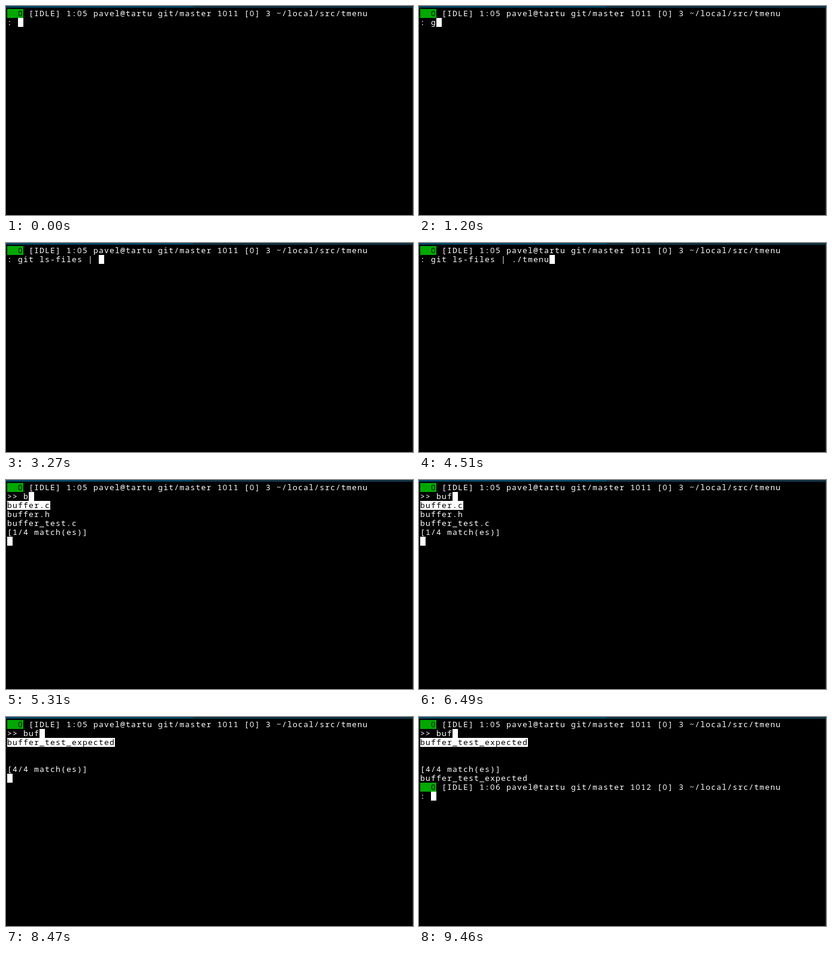
Animation of 680x350 px, one loop 9.82 s. Source, as an HTML page:

```html
<!DOCTYPE html>
<html lang="en">
<head>
<meta charset="utf-8">
<title>Terminal menu</title>
<style>
  html, body { margin: 0; width: 100%; height: 100%; overflow: hidden; background: #000; }
  svg { display: block; width: 680px; height: 350px; }
  text { font: 13px "Noto Sans Mono", "DejaVu Sans Mono", monospace; white-space: pre; }
  .zero { font-family: "Open Sans", "Noto Sans", sans-serif; }
</style>
</head>
<body>
<svg viewBox="0 0 680 350">
  <rect width="680" height="350"/>
  <g shape-rendering="crispEdges">
    <rect width="680" height="3" fill="#004a69"/>
    <rect x="313" width="367" height="2" fill="#14303c"/>
    <rect y="2" width="680" height="1" fill="#0b3a50"/>
    <rect x="679" y="3" width="1" height="347" fill="#26343a"/>
  </g>
  <g id="screen"></g>
</svg>
<script>
const LOOP = 9820, CELL = 9, ROW = 15, LEFT = 2, TOP = 5;
const WHITE = "#fff", BLACK = "#000", GREEN = "#00a800";
const screen = document.getElementById("screen");

const COMMAND = "git ls-files | ./tmenu";
const KEY_TIMES = [
  1120, 1210, 1290, 1380, 1540, 1610, 1820,
  1970, 2050, 2130, 2220, 2400, 2560, 2810, 3270,
  3520, 3630, 3890, 4000, 4110, 4230, 4340
];
const QUERY = "buf", QUERY_TIMES = [5310, 5390, 5540];
const MENU = 4810, STEP_TIMES = [6820, 7040, 7300], ACCEPT = 9330, PROMPT = 9460;

const ALL_FILES = [".gitignore", "Makefile", "README.md"];
const MATCHES = ["buffer.c", "buffer.h", "buffer_test.c", "buffer_test_expected"];
const PAGE = 3;

const passed = (times, t) => times.filter(time => time <= t).length;

function block(col, row, cells, fill) {
  return `<rect x="${LEFT + col * CELL}" y="${TOP + row * ROW}" width="${cells * CELL}" height="${ROW}" fill="${fill}"/>`;
}

function write(col, row, string, fill = WHITE) {
  const xs = [...string].map((_, i) => LEFT + (col + i) * CELL).join(" ");
  const body = string.replace(/>/g, "&gt;").replace(/0/g, '<tspan class="zero">0</tspan>');
  return `<text x="${xs}" y="${TOP + 12 + row * ROW}" fill="${fill}">${body}</text>`;
}

const cursor = (col, row) => block(col, row, 1, WHITE);

function status(row, clock, history) {
  return block(0, row, 3, GREEN) + write(2, row, "0", BLACK) +
    write(4, row, `[IDLE] ${clock} pavel@tartu git/master ${history} [0] 3 ~/local/src/tmenu`);
}

function shell(row, typed) {
  return write(0, row, ": " + typed) + cursor(2 + typed.length, row);
}

function menu(t) {
  const query = QUERY.slice(0, passed(QUERY_TIMES, t));
  const files = query ? MATCHES : ALL_FILES;
  const total = query ? MATCHES.length : 16;
  const selected = passed(STEP_TIMES, t);
  const first = Math.floor(selected / PAGE) * PAGE;
  let out = write(0, 1, ">> " + query) + cursor(3 + query.length, 1);
  files.slice(first, first + PAGE).forEach((name, i) => {
    const active = first + i === selected;
    if (active) out += block(0, 2 + i, name.length, WHITE);
    out += write(0, 2 + i, name, active ? BLACK : WHITE);
  });
  out += write(0, 5, `[${selected + 1}/${total} match(es)]`);
  if (t < ACCEPT) return out + cursor(0, 6);
  out += write(0, 6, MATCHES[selected]);
  if (t < PROMPT) return out + cursor(0, 7);
  return out + status(7, "1:06", 1012) + shell(8, "");
}

let shown = "";
function draw(t) {
  const body = t < MENU ? shell(1, COMMAND.slice(0, passed(KEY_TIMES, t))) : menu(t);
  const next = status(0, "1:05", 1011) + body;
  if (next !== shown) screen.innerHTML = shown = next;
}

const start = performance.now();
function tick() {
  draw((performance.now() - start) % LOOP);
  requestAnimationFrame(tick);
}
draw(0);
requestAnimationFrame(tick);
</script>
</body>
</html>
```
